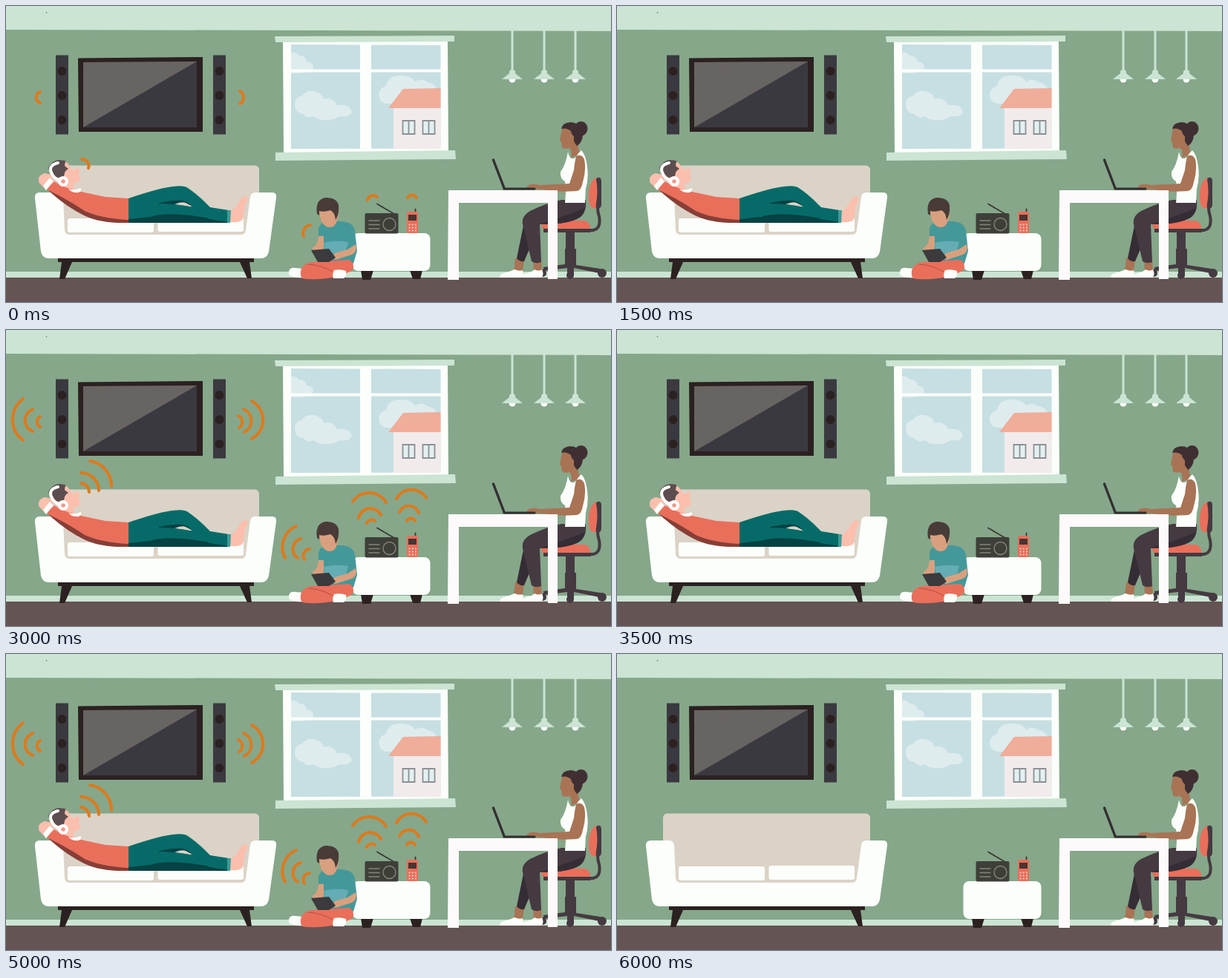
Write an HTML page that moves like this. It is 815 px wide and 400 px high and loops after 9 s.

```html
<!DOCTYPE html>
<html lang="en">
<head>
<meta charset="utf-8">
<title>Living room</title>
<style>
html, body { margin: 0; width: 100%; height: 100%; overflow: hidden; background: #86a78a }
svg { display: block; width: 100vw; height: 100vh }
.mint { fill: #cbe4d3 } .white { fill: #fbfefa } .dark { fill: #2b2120 } .slate { fill: #3b3940 }
.coral { fill: #e96f5b } .sky { fill: #c6dfe2 } .cloud { fill: #dfecee }
.pants { fill: #453a41 } .skinA { fill: #fbbfae } .skinB { fill: #d9a07f } .skinC { fill: #a87455 }
.line { fill: none; stroke-linecap: round; stroke-linejoin: round }
#waves { stroke: #dd7a1c; stroke-width: 4 }
</style>
</head>
<body>
<svg viewBox="0 0 815 400" preserveAspectRatio="none">
  <defs>
    <g id="lamp">
      <circle cy="99" r="4.5" class="white"/>
      <path class="mint" d="M-1.5 30H1.5V86L4 88V91L14 99H-14L-4 91V88L-1.5 86Z"/>
    </g>
    <g id="speaker">
      <path class="slate" d="M0 66.5H17V173.500H0Z"/>
      <g class="dark"><circle cx="8.500" cy="88" r="6"/><circle cx="8.500" cy="121" r="6"/><circle cx="8.500" cy="154" r="6"/></g>
    </g>
    <path id="pane" d="M0 0H16V18H0ZM8 0V18" fill="#e3f0f1" stroke="#8d9094" stroke-width="1.800"/>
  </defs>

  <!-- room -->
  <path fill="#86a78a" d="M0 0H815V400H0Z"/>
  <path class="mint" d="M0 0H815V34L0 32ZM0 359H815V368H0Z"/>
  <path fill="#645453" d="M0 367H815V400H0Z"/>
  <circle cx="54.500" cy="9" r=".8" fill="#56685c"/>
  <use href="#lamp" x="682"/><use href="#lamp" x="725"/><use href="#lamp" x="767"/>

  <!-- television -->
  <use href="#speaker" x="67"/><use href="#speaker" x="279"/>
  <path class="dark" d="M97 70.500L265 69V170H98Z"/>
  <path class="slate" d="M104 76L257 75V164H104Z"/>
  <path fill="#686461" d="M104 76L257 75L104 164Z"/>

  <!-- window -->
  <path class="white" d="M373 48H595L596 196L374 199Z"/>
  <path class="sky" d="M384 52L585.500 53V192.500L384 193Z"/>
  <path class="cloud" d="M384 63Q390 61 394 67Q403 66 405 75Q414 76 414 83Q412 92 384 91ZM389 133Q389 123 398 122Q404 113 415 115Q426 117 428 126Q440 122 446 134Q463 132 466 142Q465 151 449 149Q441 155 432 154Q420 155 415 149Q405 153 401 146Q389 145 389 133ZM502 121Q502 111 512 108Q515 94 530 94Q545 93 551 102Q561 97 567 103Q578 104 580 112V132H514Q503 131 502 121Z"/>
  <path fill="#f1ebec" d="M522 137H585.500V193H522Z"/>
  <path fill="#f0ad99" d="M515 138L535 112L585.500 111V138Z"/>
  <use href="#pane" x="534.500" y="155"/><use href="#pane" x="561.500" y="155"/>
  <path class="white" d="M477 50H492V195H477ZM384 85.500H586V89.500H384Z"/>
  <path class="mint" d="M362 41L604 40V48L363 49ZM363 198L605 195L606 207L363 209Z"/>

  <!-- sofa -->
  <path fill="#dbd3c7" d="M62 222Q62 216 68 215.500H335Q341 216 341 222V312H75L62 260Z"/>
  <path class="white" d="M46 252H70Q76 252 77 258L79 303Q80 309 86 309H316Q322 309 323 303L329 258Q330 252 336 252H358Q365 252 364 259L354 332Q352 341 343 341H58Q49 341 47 332L39 260Q38 252 46 252Z"/>
  <rect class="white" x="83" y="287" width="116" height="19" rx="3"/>
  <rect class="white" x="204.500" y="286" width="115.500" height="19" rx="3"/>
  <path class="dark" d="M70 341H334V346H70ZM75 346H89L79 369H72ZM315 346H328L331 368H325Z"/>

  <!-- side table -->
  <path class="dark" d="M478 357H495L491 370H480ZM544 357H561L558 369H548Z"/>
  <rect class="white" x="466.500" y="307" width="105" height="51" rx="8"/>
  <path class="line" stroke="#3b3a36" stroke-width="1.800" d="M500 267.500L523 281M551.500 274.500V279"/>
  <rect x="483.500" y="280" width="45" height="27.500" rx="2" fill="#3f3f39"/>
  <g class="line" stroke="#85867a" stroke-width="1.400"><path d="M489 290H503M489 295.500H503M489 301H503"/><circle cx="516.500" cy="295" r="8.500"/></g>
  <rect class="coral" x="540" y="278" width="15" height="29" rx="2"/>
  <path fill="#4a3432" d="M542 282H553V290H542Z"/>
  <path class="line" stroke="#fbdcd4" stroke-width="2" stroke-dasharray="0 4.200" d="M543.500 295.500H553M543.500 299.500H553M543.500 303.500H553"/>

  <!-- desk, chair and worker -->
  <g>
    <path class="coral" d="M797 232Q787 233 785 252Q784 270 790 273H797Z"/>
    <path class="pants" d="M795 234Q796 231 800 232Q802 233 802 237V268Q802 274 796 274Q794 273 795 267Q798 250 795 234Z"/>
    <path class="line" stroke="#453a41" stroke-width="4" d="M797 272Q797 279 799 284Q802 301 791 303H740"/>
    <path class="coral" d="M723 301Q718 291 727 290H780Q788 293 787 302Z"/>
    <path class="pants" d="M724 301H788V306H724ZM754 306H766V328H768V350L800 355Q806 356 806 361H799L765 354V363H756V354L724 358V353L753 349V328H754Z"/>
    <g class="pants"><circle cx="760" cy="364" r="5"/><circle cx="803" cy="361" r="6"/><circle cx="723" cy="361" r="5"/></g>
    <path class="skinC" d="M686 341H698L696 359H684ZM710 343H721L722 359H711Z"/>
    <path class="white" d="M665 366Q665 362 674 360Q681 358 685 356Q692 359 696 357L697 367H666ZM694 366Q694 363 702 361Q709 359 712 356Q718 359 722 356Q725 362 722 367H695Z"/>
    <path fill="#352d35" d="M699 287L688 341Q692 346 698 345L718 298Z"/>
    <path class="pants" d="M748 262H781Q783 282 769 288Q748 296 719 295L721 346Q714 349 708 345L696 295Q694 284 706 277Q726 267 748 262Z"/>
    <path fill="#352d35" d="M780 273Q777 286 764 290Q744 296 721 294Q754 284 780 273Z"/>
    <path class="skinC" d="M749 166Q747 175 746 182L748 184L749 191Q751 194 759 192Q763 196 761 205L774 200Q769 193 772 184L774 169L758 160Z"/>
    <path fill="#3f2f32" d="M748 166Q749 158 760 157Q765 157 768 159Q772 154 779 157Q786 163 782 171Q779 175 777 175Q776 185 769 189L765 183V176Q761 173 761 169Q755 164 748 166Z"/>
    <path class="white" d="M757 197Q760 211 768 204Q771 198 775 195Q781 201 783 217Q785 234 781 247L780 266H753Q755 247 753 237Q746 233 747 224Q754 215 757 197Z"/>
    <path class="skinC" d="M768 203Q775 199 779 207Q782 221 777 238Q775 249 769 250Q744 252 725 248L704 247Q699 245 704 242Q711 239 719 242L759 240L765 222Q766 211 768 203Z"/>
    <path class="line" stroke="#332f30" stroke-width="3.400" d="M656.500 208L671 246"/>
    <path class="line" stroke="#332f30" stroke-width="3" d="M671 247H712"/>
    <path fill="#fefafb" d="M596 249H743V369H730V266H610V370H595Z"/>
  </g>

  <g id="people">
    <!-- man on the sofa -->
    <path class="skinA" d="M44 233Q45 228 52 226L62 228L64 240L53 248Q48 242 44 238Z"/>
    <path class="skinA" d="M72 214L82 211Q87 217 90 222L97 218Q100 222 98 227L100 235Q98 239 91 240L92 249L80 246L66 234Z"/>
    <path fill="#5c4d4f" d="M57 219Q61 209 72 208L80 209L79 216L84 220Q79 222 78 230L70 232Q62 230 57 219Z"/>
    <path class="coral" d="M54 247L65 237Q77 245 96 250L134 258L165 260V293Q132 294 106 281Q78 264 54 247Z"/>
    <path fill="#873e36" d="M57 249Q84 262 106 277Q128 287 165 289V293Q127 294 105 283Q79 270 57 249Z"/>
    <path class="white" d="M50 243L59 232L64 237L54 249ZM84 247Q92 250 101 246Q102 253 94 252Q88 252 84 247Z"/>
    <path class="line" stroke="#fff" stroke-width="4" d="M70 212Q57 215 61 225Q64 233 74 237"/>
    <circle cx="77" cy="237" r="7" fill="#fff"/><circle cx="77" cy="237" r="2.800" fill="#ee9b8c"/>
    <path class="skinA" d="M302 277Q310 273 314 264Q319 255 325 257Q327 260 322 269L319 288Q317 293 302 292Z"/>
    <path fill="#044243" d="M165 286L205 266Q235 258 257 266L299 284V293H165Z"/>
    <path fill="#dbd3c7" d="M227 268Q236 264 242 266L253 272Z"/>
    <path fill="#066b68" d="M165 260Q200 248 218 245Q239 241 245 246Q260 256 275 272L300 276V292L274 288Q253 277 247 267Q237 258 203 267Q229 267 252 272L284 289Q220 276 194 285L165 288Z"/>
    <path fill="#3f9a97" d="M298 276H303L302 293H298Z"/>

    <!-- boy with tablet -->
    <path class="white" d="M381 359Q382 353 390 354L401 355V367Q386 368 381 363Z"/>
    <path fill="#459899" d="M421 301Q423 292 433 291H452Q468 292 470 304L473 331L468 348H427L421 326Z"/>
    <path fill="#64adb5" d="M428 320Q444 316 461 319L457 334L430 335Z"/>
    <path class="skinB" d="M422 276H447Q449 285 446 289Q444 300 434 299Q423 296 422 276ZM421 311H428L428 331H415L412 327Q420 325 421 311ZM471 322Q474 332 466 336L444 343L437 340L443 334L460 329Z"/>
    <path fill="#493b37" d="M419 281Q416 262 430 259Q445 258 448 269Q449 282 444 289Q443 279 437 276Q428 279 422 277V283Z"/>
    <path class="coral" d="M397 358Q399 348 412 346L462 343Q469 346 468 354Q464 362 452 361L440 367Q412 371 399 368Q396 364 397 358Z"/>
    <path class="line" stroke="#b64e40" stroke-width="1" d="M407 349Q425 350 440 359"/>
    <path class="white" d="M442 357Q450 355 458 358Q459 365 455 368H441Q439 363 442 357Z"/>
    <path fill="#3b3a3c" d="M411 330L435 328L444 340L435 346H420Z"/>
  </g>

  <!-- sound waves; data-on lists the ring counts that show each path -->
  <g id="waves" class="line">
    <path data-on="1" d="M46 116A8 8 0 0 0 46 131M315 115A9.700 9.700 0 0 1 315 132M102 207A9 9 0 0 1 111 219M410 296A11 11 0 0 0 401 311M487 262A8 8 0 0 1 500 258M541 259A7 7 0 0 1 553 259"/>
    <path data-on="23" d="M46 117A8 8 0 0 0 46 131M313 116A9 9 0 0 1 314 132M101 207A12 12 0 0 1 112 219M409 296A9 9 0 0 0 402 310M486 261A7 7 0 0 1 497 258M540 258A6 6 0 0 1 551 258"/>
    <path data-on="2" d="M34 106A19 19 0 0 0 34 138M320 106A16 16 0 0 1 320 136M102 195A26 26 0 0 1 123 218M403 283A15 15 0 0 0 389 306M479 252A13 13 0 0 1 500 249M531 247A14.500 14.500 0 0 1 557 246"/>
    <path data-on="3" d="M36 107A16 16 0 0 0 36 137M320 107A17 17 0 0 1 321 138M101 193A24 24 0 0 1 125 217M397 282A14.500 14.500 0 0 0 393 308M475 254A16 16 0 0 1 505 250M530 246A14 14 0 0 1 556 247"/>
    <path data-on="3" d="M23 93A35 35 0 0 0 23 149M331 96A29 29 0 0 1 331 147M113 177A34 34 0 0 1 142 211M391 265A31 31 0 0 0 376 308M467 232A26.500 26.500 0 0 1 512 233M526 228A23 23 0 0 1 566 227"/>
  </g>
</svg>
<script>
const LOOP = 9000, STEP = 500, LEAVE = 6000;
const people = document.getElementById('people');
const waves = document.querySelectorAll('#waves path');
const show = (el, on) => el.setAttribute('visibility', on ? 'visible' : 'hidden');
const start = performance.now();

function draw(now) {
  const t = Math.max(0, now - start) % LOOP;
  const home = t < LEAVE;
  // one, two, three rings, then silence
  const rings = home ? (Math.floor(t / STEP) + 1) % 4 : 0;
  show(people, home);
  waves.forEach(w => show(w, w.dataset.on.includes(rings)));
  requestAnimationFrame(draw);
}
draw(start);
</script>
</body>
</html>
```
